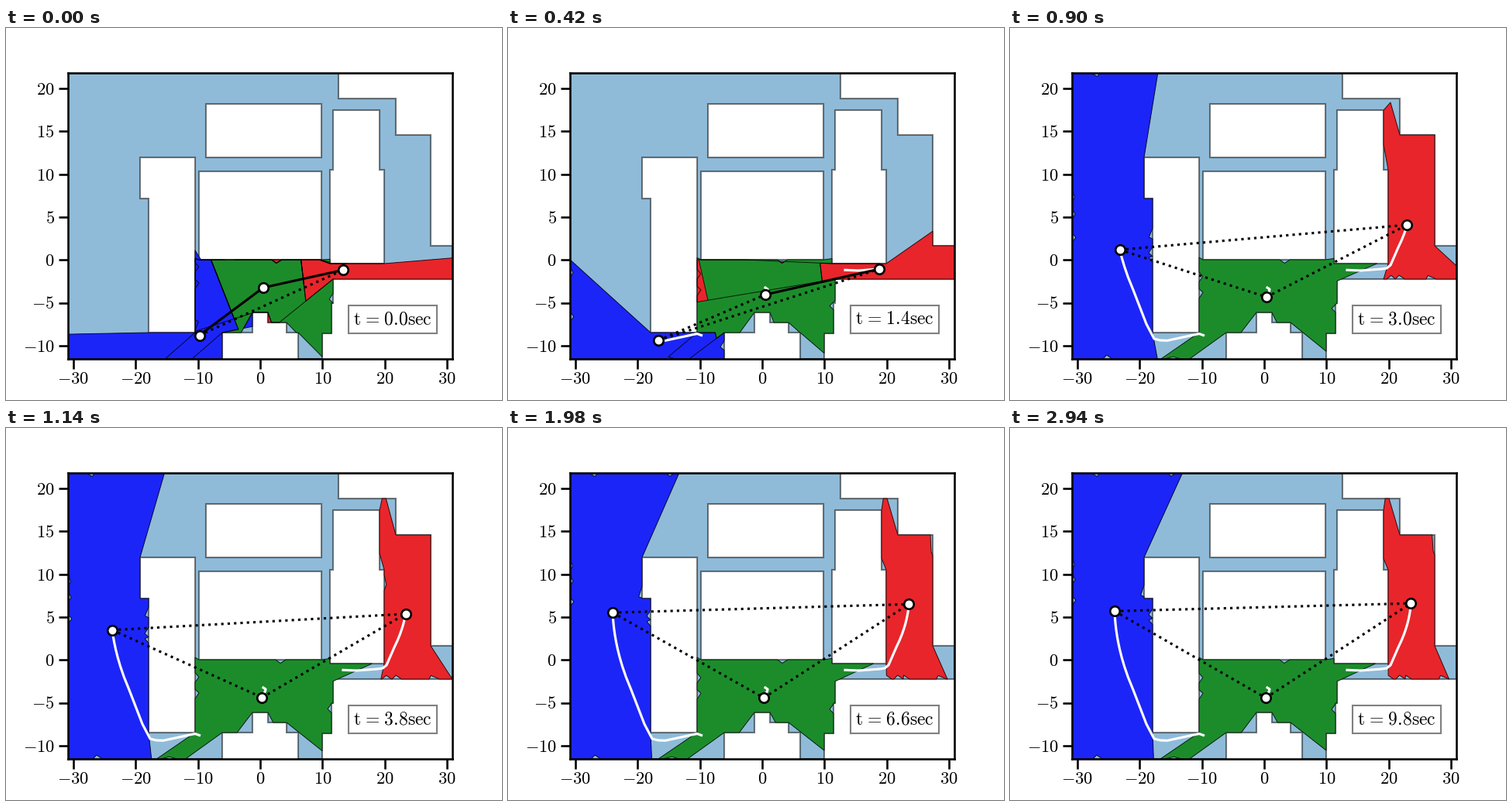
Recreate the animation shown at these times as a matplotlib script. Size 640x480 px, loop 3000 ms.

```python
import numpy as np
import matplotlib.pyplot as plt
from matplotlib.animation import FuncAnimation
from matplotlib.patches import Polygon, Rectangle

plt.rcParams["mathtext.fontset"] = "cm"

FRAMES, INTERVAL, DT = 50, 60, 0.2
UNIT = np.array([8.033, 11.06])  # stage pixels per axis unit
ORIGIN = (328, 299.2)
COLORS = BLUE, GREEN, RED = "#1c25f7", "#1c8c2b", "#e8252b"
EDGE = (0, 0, 0, 0.8)
TRIM = 0.045   # angle lost behind each occluding corner
EPS = 1e-4
TURN = 2 * np.pi

# Floor plan, in stage pixels
OUTER = [(80, 57.6), (429, 57.6), (429, 91), (503, 91), (503, 138), (548, 138),
         (548, 281), (576, 281), (576, 324), (422, 324), (422, 355), (420, 355),
         (420, 394), (408, 394), (408, 427), (377, 427), (377, 393), (362, 393),
         (362, 380), (338, 380), (338, 367), (318, 367), (318, 393), (279, 393),
         (279, 427), (80, 427)]
BLOCKS = [
    [(173, 167), (244, 167), (244, 393), (184, 393), (184, 220), (173, 220)],
    [(249, 185), (407, 185), (407, 299), (249, 299)],
    [(258, 98), (407, 98), (407, 167), (258, 167)],
    [(422, 106), (482, 106), (482, 183), (488, 183), (488, 304), (418, 304),
     (418, 183), (422, 183)],
]
LOOPS = [np.array(loop, float) for loop in [OUTER] + BLOCKS]
CORNERS = np.vstack(LOOPS)
SIDES = np.vstack([np.roll(loop, -1, axis=0) - loop for loop in LOOPS])


def track(keys, goal, bend):
    """Follow (step, x, y) keys, then settle exponentially on the goal."""
    k = np.array(keys, float)
    steps = np.arange(FRAMES)
    x, y = (np.interp(steps, k[:, 0], k[:, c]) for c in (1, 2))
    s = np.exp(-0.178 * np.maximum(steps - k[-1, 0], 0))
    settling = steps >= k[-1, 0]
    sx = goal[0] + (k[-1, 1] - goal[0]) * (bend * s + (1 - bend) * s ** 2)
    sy = goal[1] + (k[-1, 2] - goal[1]) * s
    return np.column_stack([np.where(settling, sx, x), np.where(settling, sy, y)])


TRACKS = [
    track([(0, 249.5, 396.5), (1, 244, 394.5), (6, 203, 403.3), (7, 194, 403),
           (8, 186, 401), (9, 176, 382), (11, 159, 338)], (135, 236.2), 0.15),
    track([(0, 332, 335), (1, 335, 337), (3, 334.5, 339.5), (7, 332, 344),
           (11, 332, 346)], (330, 348.3), 1),
    track([(0, 435, 312.3), (3, 452, 313), (7, 479, 311), (8, 486, 310),
           (9, 491, 306), (11, 501, 283)], (517.3, 226.2), 0.25),
]


def cross(a, b):
    return a[..., 0] * b[..., 1] - a[..., 1] * b[..., 0]


def cast(p, dirs):
    """Distance to the nearest wall along each direction, in lengths of it."""
    d = dirs[:, None, :]
    rel = (CORNERS - p)[None]
    den = cross(d, SIDES[None])
    den = np.where(np.abs(den) < 1e-12, 1e-12, den)
    t = cross(rel, SIDES[None]) / den
    u = cross(rel, d) / den
    hit = (t > 1e-9) & (u > -1e-9) & (u < 1 + 1e-9)
    return np.where(hit, t, 1e4).min(axis=1)


def heading(a):
    return np.column_stack([np.cos(a), np.sin(a)])


def inside(a, start, span):
    d = (a - start) % TURN
    return (d > 1e-7) & (d < span - 1e-7)


def view(p, seed):
    """Sensed outline: visible area, short of corners and nicked at walls."""
    d = CORNERS - p
    a = np.arctan2(d[:, 1], d[:, 0])
    a = np.concatenate([a + off for off in (-TRIM, -EPS, EPS, TRIM)]) % TURN
    r = cast(p, heading(a))

    for mid in np.random.default_rng(seed).uniform(0, TURN, 10):
        w = 8 / cast(p, heading(np.array([mid])))[0]
        nick = mid + w * np.array([-1, 0, 0.5])
        reach = cast(p, heading(nick))
        flat = abs(reach[0] + 2 * reach[2] - 3 * reach[1]) < 5
        if flat and reach[1] > 40:
            keep = ~inside(a, nick[0], 1.5 * w)
            reach[1] -= 5
            a = np.append(a[keep], nick % TURN)
            r = np.append(r[keep], reach)

    order = np.argsort(a)
    a, r = a[order], r[order]
    keep = np.ones(len(a), bool)
    jump = np.roll(r, -1) - r
    step = (np.roll(a, -1) - a) % TURN
    for k in np.flatnonzero((step < 3 * EPS) & (abs(jump) > 10)):
        start = a[k] if jump[k] > 0 else a[(k + 1) % len(a)] - TRIM
        keep &= ~inside(a, start, TRIM)
    return p + heading(a[keep]) * r[keep, None]


def nearer(poly, p, q):
    """Part of a polygon closer to p than to q."""
    if len(poly) == 0:
        return poly
    f = (((poly - q) / UNIT) ** 2).sum(1) - (((poly - p) / UNIT) ** 2).sum(1)
    out = []
    for i in range(len(poly)):
        j = (i + 1) % len(poly)
        if f[i] >= 0:
            out.append(poly[i])
        if (f[i] >= 0) != (f[j] >= 0):
            out.append(poly[i] + (poly[j] - poly[i]) * f[i] / (f[i] - f[j]))
    return np.array(out).reshape(-1, 2)


def linked(p, q):
    close = np.hypot(*((q - p) / UNIT)) < 24
    return close and cast(p, (q - p)[None])[0] > 1


fig = plt.figure(figsize=(6.4, 4.8), dpi=100, facecolor="white")
ax = fig.add_axes([0.125, 0.11, 0.775, 0.77])
ax.set_xlim(80, 576)
ax.set_ylim(427.2, 57.6)
xs, ys = range(-30, 31, 10), range(-10, 21, 5)
ax.set_xticks([ORIGIN[0] + UNIT[0] * v for v in xs], [f"${v}$" for v in xs])
ax.set_yticks([ORIGIN[1] - UNIT[1] * v for v in ys], [f"${v}$" for v in ys])
ax.tick_params(length=9, width=1.875, labelsize=16.2, pad=3.5)
ax.tick_params(axis="x", pad=2.6)
for spine in ax.spines.values():
    spine.set_linewidth(1.875)

for n, loop in enumerate(LOOPS):
    ax.add_patch(Polygon(loop, fc="white" if n else "#8fbbd9",
                         ec=(0, 0, 0, 0.5), lw=1.5, zorder=1))
ax.add_patch(Rectangle((442, 358), 114, 36.3, fc="white", ec="#808080",
                       lw=1.5, zorder=8))
clock = ax.text(448, 382.5, "", fontsize=17, va="baseline", zorder=9)
live = []


def shape(poly, z, fc="none", ec="none", clip=None):
    if len(poly) < 3:
        return
    patch = ax.add_patch(Polygon(poly, fc=fc, ec=ec, lw=0.7, zorder=z))
    if clip is not None:
        patch.set_clip_path(Polygon(clip, transform=ax.transData))
    live.append(patch)


def draw(step):
    while live:
        live.pop().remove()
    pos = [path[step] for path in TRACKS]
    views = [view(p, seed) for seed, p in enumerate(pos)]

    # Shared ground goes to the nearest agent that sees it
    for i, p in enumerate(pos):
        shape(views[i], 2, fc=COLORS[i])
        others = [j for j in range(3) if j != i]
        cell = views[i]
        for j in others:
            cell = nearer(cell, p, pos[j])
        shape(cell, 2.2 + i / 10, fc=COLORS[i])
        shape(views[i], 2.2 + i / 10, ec=EDGE)
        for j in others:
            shape(cell, 2.6, ec=EDGE, clip=views[j])

    for path in TRACKS:
        live.extend(ax.plot(*path[:step + 1].T, color="white", lw=2.25, zorder=4))
    for i, j in ((0, 1), (0, 2), (1, 2)):
        style = "-" if linked(pos[i], pos[j]) else ":"
        live.extend(ax.plot(*np.array([pos[i], pos[j]]).T, style, color="black",
                            lw=2.25, zorder=5))
    live.extend(ax.plot(*np.array(pos).T, "o", ms=9, mfc="white", mec="black",
                        mew=1.9, zorder=6))
    clock.set_text(r"$\mathrm{t}\hspace{0.1}=\hspace{0.1}\mathrm{%.1fsec}$"
                   % (step * DT))
    return live


anim = FuncAnimation(fig, draw, frames=FRAMES, init_func=lambda: draw(0),
                     interval=INTERVAL, repeat=True, repeat_delay=0, blit=False)
plt.show()
```
